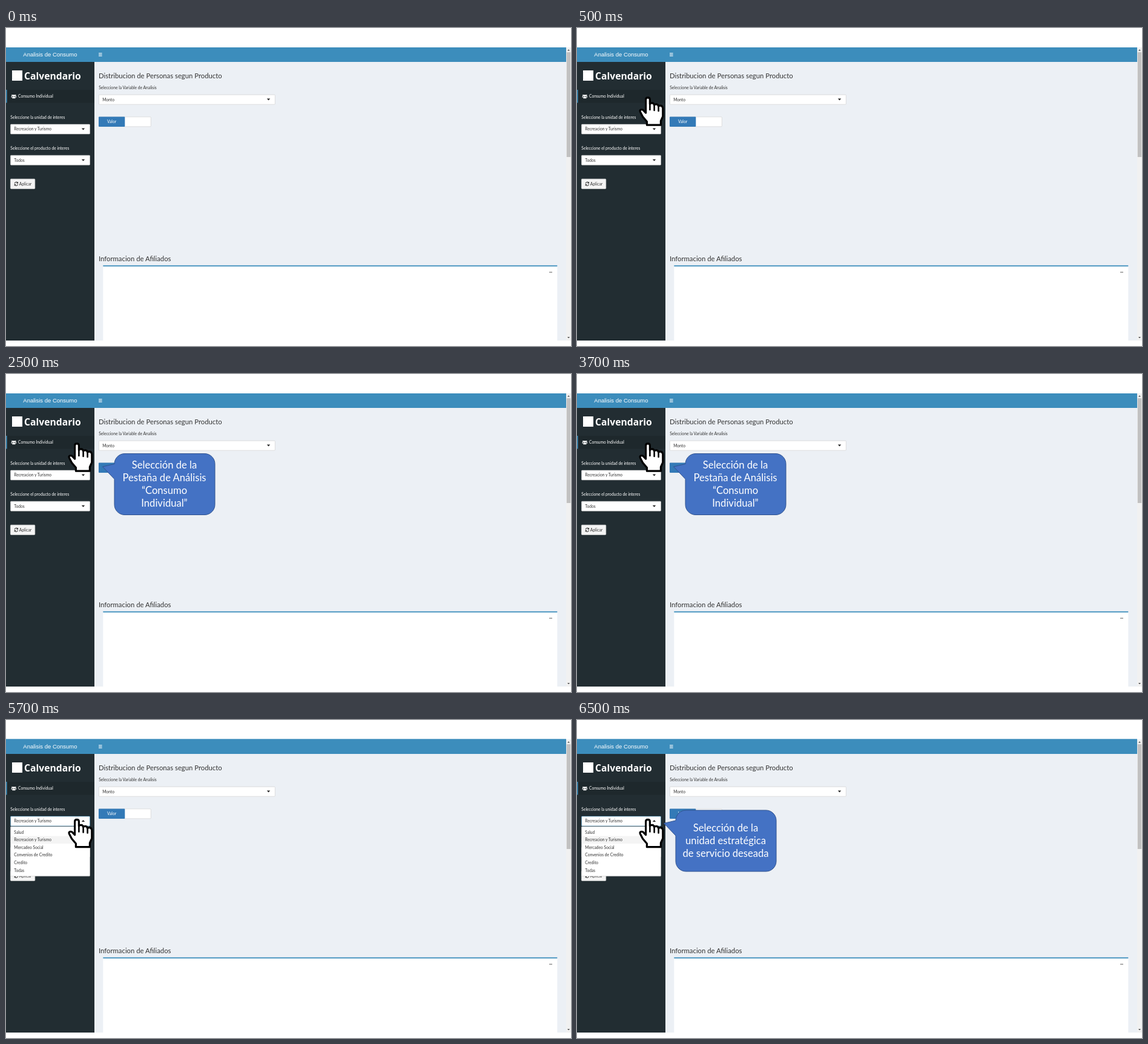
Animation of 933 by 525 pixels, one loop 8000 ms. Source, as an HTML page:

```html
<!DOCTYPE html>
<html lang="es">
<head>
<meta charset="utf-8">
<style>
  html, body { margin: 0; width: 100%; height: 100%; overflow: hidden; background: #fff; }
  svg { display: block; width: 100vw; height: 100vh; }
  text { font: 6.7px Lato, sans-serif; fill: #333; white-space: pre; }
  .light text, text.light { fill: #fff; }
  text.head { font-size: 11.3px; }
  text.title { font: 9.5px "Liberation Sans", Arial, sans-serif; }
  text.brand { font: 700 15.7px "Open Sans", sans-serif; }
  .callout text { font-size: 16.6px; fill: #fff; text-anchor: middle; }
  .callout path { fill: #4472c4; stroke: #2f528f; }
  .field { fill: #fff; stroke: #ccc; stroke-width: .6; }
</style>
</head>
<body>
<svg viewBox="0 0 933 525">
  <!-- page -->
  <rect y="56" width="925" height="460" fill="#ecf0f5"/>
  <rect y="56" width="146" height="460" fill="#222d32"/>
  <rect id="bar" width="925" fill="#3c8dbc"/>
  <text class="title light" x="28.3" y="47">Analisis de Consumo</text>
  <path d="M153 41.7h5.6M153 43.9h5.6M153 46.1h5.6" stroke="#fff" stroke-width="1"/>

  <!-- scrollbar -->
  <rect x="925" y="32" width="8" height="484" fill="#f1f1f1"/>
  <rect x="925.8" y="40" width="6.4" height="173" fill="#c1c1c1"/>
  <path d="M927 37.5l2-2.2 2 2.2zM927 510l2 2.2 2-2.2z" fill="#505050"/>

  <!-- sidebar -->
  <rect x="10" y="70" width="17" height="17" fill="#fff"/>
  <text class="brand light" x="30" y="85">Calvendario</text>
  <rect y="102" width="146" height="21.5" fill="#1e282c"/>
  <rect y="102" width="1.6" height="21.5" fill="#3c8dbc"/>
  <g fill="#fff">
    <circle cx="10.4" cy="111.3" r="1.2"/><circle cx="15.4" cy="111.3" r="1.2"/><circle cx="12.9" cy="111.7" r="1.7"/>
    <path d="M8.6 114.6v-1.8h2.2l-.6 1.8zM17.2 114.6v-1.8H15l.6 1.8zM10.3 116.2v-1.4q.6-1.4 2.6-1.4t2.6 1.4v1.4z"/>
  </g>
  <g class="light">
    <text x="20" y="115.3">Consumo Individual</text>
    <text x="7.3" y="149.8">Seleccione la unidad de interes</text>
    <text x="7.3" y="201.3">Seleccione el producto de interes</text>
  </g>
  <rect id="unit" class="field" x="7.5" y="159" width="131" height="16" rx="1"/>
  <text x="13.3" y="169.3">Recreacion y Turismo</text>
  <path id="caret" fill="#222"/>
  <rect class="field" x="7.5" y="210.2" width="131" height="16" rx="1"/>
  <text x="13.3" y="220.7">Todos</text>
  <path d="M124.8 216.8h5.4l-2.7 3z" fill="#222"/>
  <rect x="7.4" y="249.2" width="40.4" height="16.2" rx="1.2" fill="#f4f4f4" stroke="#ddd" stroke-width=".6"/>
  <path d="M14.2 256.6a2.8 2.8 0 0 1 5-1.1M19.6 258a2.8 2.8 0 0 1-5 1.1" fill="none" stroke="#333" stroke-width="1.1"/>
  <path d="M20.1 253.8v3h-3zM13.7 260.8v-3h3z" fill="#333"/>
  <text x="21.8" y="259.8">Aplicar</text>

  <!-- content -->
  <text class="head" x="153" y="83">Distribucion de Personas segun Producto</text>
  <text x="153.2" y="101.3">Seleccione la Variable de Analisis</text>
  <rect class="field" x="153.3" y="110.2" width="291" height="16" rx="1"/>
  <text x="159.2" y="120.7">Monto</text>
  <path d="M430.8 116.6h5.4l-2.7 3z" fill="#222"/>
  <rect class="field" x="153.3" y="146.8" width="86" height="16" rx="1"/>
  <rect x="153" y="146.5" width="43.3" height="16.6" rx="1" fill="#337ab7"/>
  <text class="light" x="167" y="157.3">Valor</text>
  <text class="head" x="153" y="384.6">Informacion de Afiliados</text>
  <rect x="160.3" y="392" width="750" height="124" fill="#fff"/>
  <rect x="160.3" y="391.8" width="750" height="1.8" fill="#3c8dbc"/>
  <path d="M897 403.2h5" stroke="#777" stroke-width="1.2"/>

  <!-- overlays -->
  <g id="menu">
    <rect class="field" x="7.5" y="176" width="131" height="81.8" rx="1"/>
    <rect x="8" y="191.6" width="130" height="12.6" fill="#f4f4f4"/>
  </g>
  <g id="hand" fill="#fff" stroke="#000" stroke-width="3.2" stroke-linejoin="round" stroke-linecap="round">
    <path d="M113.6 140V118.2Q113.6 114.8 117 114.8T120.4 118.2V125.5Q121 123.8 124 123.8T127.6 127.2Q128.6 125.6 131.2 125.8T134.6 129.2Q135.6 127.8 138.2 128.2T141.8 132V146L138.4 153.5V160.2H115.4V154.5L108.6 146.5 104.4 138.5Q103.2 135.2 106 134.8T110 136.4Z"/>
    <path d="M120.4 125V135M127.6 128V136M134.6 130V137" stroke-width="2.6"/>
  </g>
  <g id="callout" class="callout">
    <path d="M196 131.5H328a17 17 0 0 1 17 17V215.5a17 17 0 0 1-17 17H196a17 17 0 0 1-17-17V173.5L159.5 153 179 148.5a17 17 0 0 1 17-17Z"/>
    <g id="lines"></g>
  </g>
</svg>
<script>
  const $ = id => document.getElementById(id);
  const column = (items, x, y, step) =>
    items.map((s, i) => `<text x="${x}" y="${y + i * step}">${s}</text>`).join('');
  const show = (id, on) => $(id).style.display = on ? '' : 'none';

  $('menu').innerHTML += column(['Salud', 'Recreacion y Turismo', 'Mercadeo Social',
    'Convenios de Credito', 'Credito', 'Todas'], 13.3, 187.5, 12.65);

  const notes = [
    ['Selección de la', 'Pestaña de Análisis', '“Consumo', 'Individual”'],
    ['Selección de la', 'unidad estratégica', 'de servicio deseada']
  ];
  const starts = [0, 500, 2500, 4500, 6500];
  let current = -1;

  function draw(step) {
    const open = step > 2;
    const top = open ? 31.3 : 32;
    $('bar').setAttribute('y', top);
    $('bar').setAttribute('height', 56 - top);
    $('unit').style.stroke = open ? '#3c8dbc' : '';
    $('caret').setAttribute('d', open ? 'M124.8 168h5.4l-2.7-3z' : 'M124.8 165.5h5.4l-2.7 3z');
    show('menu', open);
    show('hand', step > 0);
    $('hand').setAttribute('transform', `translate(0 ${open ? 49.5 : 0})`);
    show('callout', step === 2 || step === 4);
    $('callout').setAttribute('transform', open ? 'translate(-16 17.5)' : '');
    $('lines').innerHTML = column(notes[+open], 261.5, open ? 166.5 : 155.5, 21.1);
  }

  function tick() {
    const t = performance.now() % 8000;
    const step = starts.filter(s => s <= t).length - 1;
    if (step !== current) draw(current = step);
    requestAnimationFrame(tick);
  }
  tick();
</script>
</body>
</html>
```
